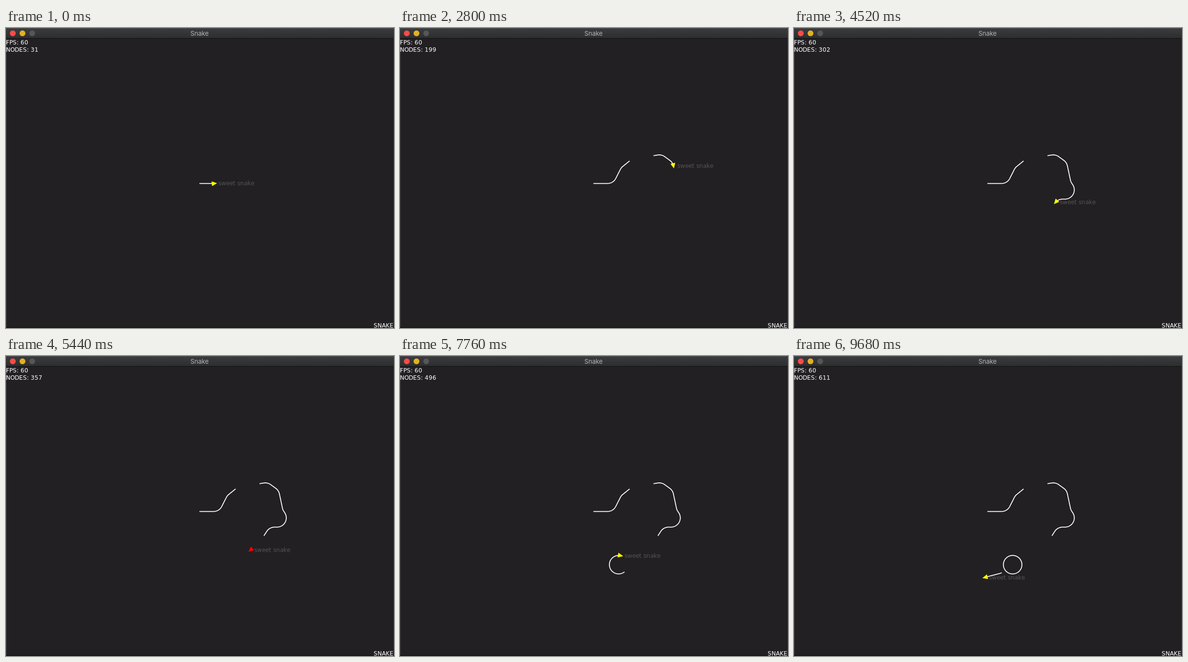
Write an HTML page with a canvas that moves like this. It is 800 px wide and 620 px high and loops after 9720 ms.

```html
<!DOCTYPE html>
<html lang="en">
<head>
<meta charset="utf-8">
<title>Snake</title>
<style>
  html, body { margin: 0; width: 100%; height: 100%; overflow: hidden; background: #222023; }
  canvas { display: block; }
</style>
</head>
<body>
<canvas id="stage" width="800" height="620"></canvas>
<script>
const ctx = document.getElementById('stage').getContext('2d');
const LOOP = 9720, STEP = 40, FIRST_NODE = 31, NODES_PER_MS = 0.06;
const TURN = 3; // degrees per node; every node advances 1px

const rad = deg => deg * Math.PI / 180;
const path = [{ x: 398.8, y: 321.4, heading: 0 }];

function advance(turn) {
  const { x, y, heading } = path[path.length - 1];
  const mid = rad(heading + turn / 2);
  path.push({ x: x + Math.cos(mid), y: y + Math.sin(mid), heading: heading + turn });
}

// Turn at the fixed rate until facing the heading, then go straight
function steer(heading, straight) {
  const delta = heading - path[path.length - 1].heading;
  for (let i = Math.abs(delta) / TURN; i > 0; i--) advance(Math.sign(delta) * TURN);
  for (let i = 0; i < straight; i++) advance(0);
}

steer(0, 29);
steer(-63, 21);
steer(-39, 19);
steer(-9, 49);
steer(36, 13);
steer(78, 30);
steer(57, 4);
steer(180, 5);
steer(123, 26);
steer(141, 52);
steer(117, 14);
steer(564, 0); // more than a full circle
steer(525, 40);

// The snake jumps, leaving no trail, between these nodes
const jumps = [[97, 148], [316, 419], [545, 575]];
const isJumping = node => jumps.some(([from, to]) => node > from && node < to);

// Glyphs sit on whole pixels
function label(str, x, y, color) {
  ctx.font = '12px "DejaVu Sans", sans-serif';
  ctx.fillStyle = color;
  ctx.textAlign = 'left';
  for (const glyph of str) {
    ctx.fillText(glyph, x, y);
    x += Math.round(ctx.measureText(glyph).width);
  }
}

function rect(x, y, w, h, color) {
  ctx.fillStyle = color;
  ctx.fillRect(x, y, w, h);
}

function drawWindow() {
  rect(0, 0, 800, 620, '#222023');
  const bar = ctx.createLinearGradient(0, 0, 0, 21);
  bar.addColorStop(0, '#3b3c3e');
  bar.addColorStop(1, '#2d2e30');
  rect(0, 0, 800, 21, bar);
  rect(0, 0, 800, 1, '#545557');
  rect(0, 21, 800, 1, '#0e0d0f');
  rect(0, 22, 1, 598, '#454347');
  rect(799, 0, 1, 620, '#3a383c');
  rect(0, 618, 800, 2, '#1b161b');
  ['#fc4b48', '#e3b023', '#565656'].forEach((color, i) => {
    ctx.fillStyle = color;
    ctx.beginPath();
    ctx.arc(14 + 20 * i, 11, 6, 0, 7);
    ctx.fill();
  });
  ctx.font = '13px Inter, sans-serif';
  ctx.fillStyle = '#b4b4b5';
  ctx.textAlign = 'center';
  ctx.fillText('Snake', 399, 16);
  label('SNAKE', 758, 619, '#fff');
}

function drawTrail(node) {
  ctx.strokeStyle = '#fff';
  ctx.lineWidth = 1.8;
  ctx.lineJoin = 'round';
  ctx.beginPath();
  path.slice(0, node + 1).forEach(({ x, y }, i) => {
    if (isJumping(i - 1)) ctx.moveTo(x, y);
    else if (!isJumping(i)) ctx.lineTo(x, y);
  });
  ctx.stroke();
}

function drawHead(node) {
  const { x, y, heading } = path[node];
  label('sweet snake', Math.round(x + 8), Math.round(y + 4), '#555356');
  ctx.save();
  ctx.translate(x, y);
  ctx.rotate(rad(heading));
  ctx.fillStyle = isJumping(node) ? '#f00' : '#ff0';
  ctx.beginPath();
  ctx.moveTo(5.5, 0);
  ctx.lineTo(-5.5, -5);
  ctx.lineTo(-5.5, 5);
  ctx.fill();
  ctx.restore();
}

function frame() {
  const time = Math.floor(performance.now() % LOOP / STEP) * STEP;
  const node = FIRST_NODE + Math.floor(time * NODES_PER_MS + 1e-6);
  drawWindow();
  label('FPS: 60', 0, 34, '#fff');
  label('NODES: ' + node, 0, 49, '#fff');
  drawTrail(node);
  drawHead(node);
  requestAnimationFrame(frame);
}
frame();
</script>
</body>
</html>
```
